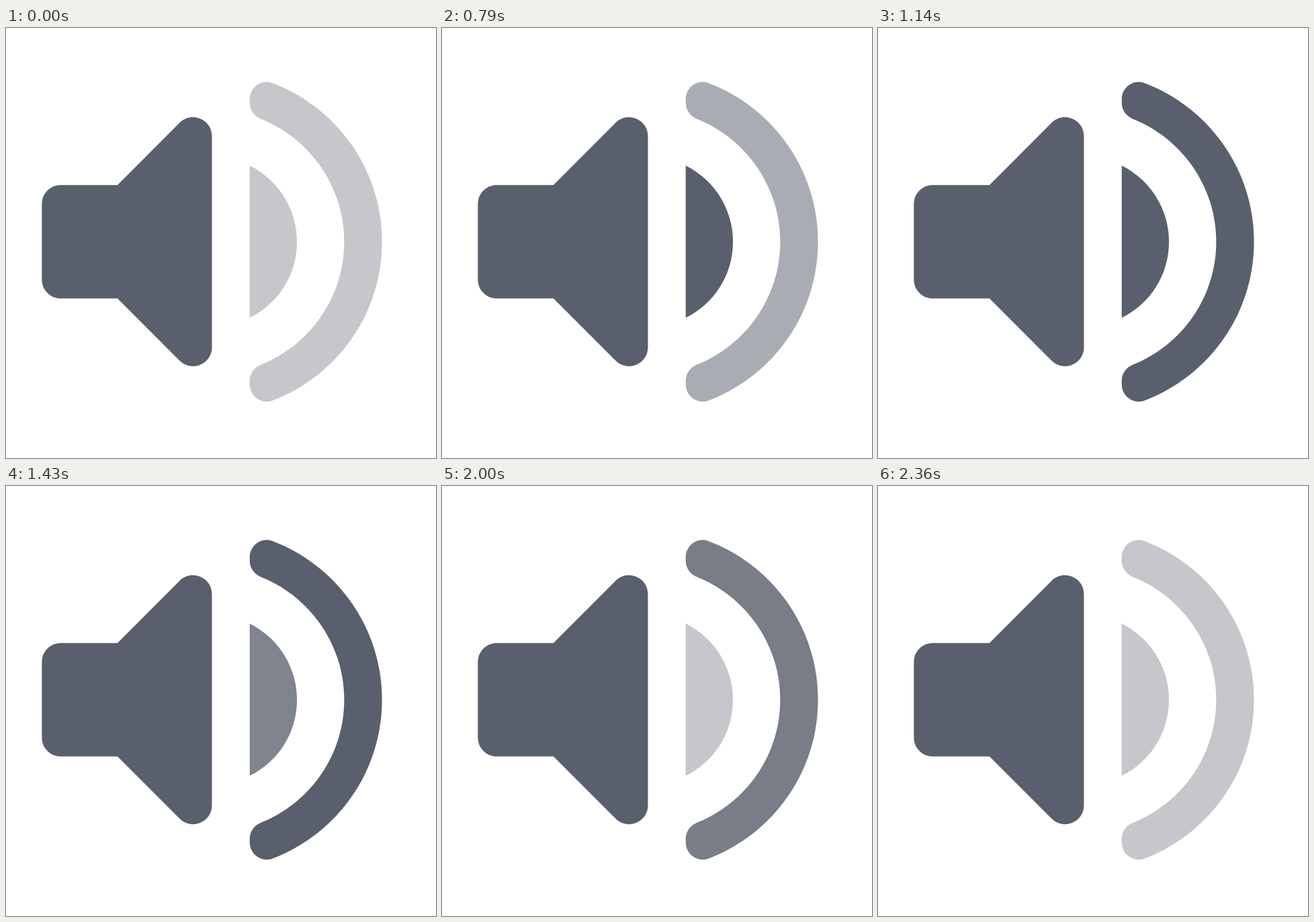
These frames come from a looping animation (640x640 px, 2430 ms). An HTML page:

```html
<!DOCTYPE html>
<html lang="en">
<head>
<meta charset="utf-8">
<title>Volume</title>
<style>
  html, body { margin: 0; height: 100%; overflow: hidden; background: #fff; }
  svg { display: block; width: 100%; height: 100%; fill: #595f6c; }
</style>
</head>
<body>
<svg viewBox="0 0 640 640">
  <g transform="translate(-31 -19.3) scale(28.125)">
    <path d="M3 10v4c0 .55.45 1 1 1h3l3.29 3.29c.63.63 1.71.18 1.71-.71V6.41c0-.89-1.08-1.34-1.71-.71L7 9H4c-.55 0-1 .45-1 1z"/>
    <path id="inner" d="M16.5 12c0-1.77-1.02-3.29-2.5-4.03v8.05c1.48-.73 2.5-2.25 2.5-4.02z"/>
    <path id="outer" d="M14 4.45v.2c0 .38.25.71.6.85C17.18 6.53 19 9.06 19 12s-1.82 5.47-4.4 6.5c-.36.14-.6.47-.6.85v.2c0 .63.63 1.07 1.21.85C18.6 19.11 21 15.84 21 12s-2.4-7.11-5.79-8.4c-.58-.23-1.21.22-1.21.85z"/>
  </g>
</svg>
<script>
const LOOP = 2430, STEP = 1000 / 14, FADE = 560, DIM = 0.35;
const inner = document.getElementById('inner');
const outer = document.getElementById('outer');

function ease(ms) {
  const p = Math.min(1, Math.max(0, ms / FADE));
  return p * p * (3 - 2 * p);
}

// Fades in at once; the fade out holds full strength, then drops.
function level(t, start) {
  const out = ease(t - start - 1200);
  const p = ease(t - start) - (out < 0.2 ? 0 : out);
  return DIM + (1 - DIM) * p;
}

function draw(now) {
  const frame = Math.min(33, Math.floor((now % LOOP + 4.5) / STEP));
  const t = frame * STEP;
  inner.style.opacity = level(t, 0);
  outer.style.opacity = level(t, 600);
}

const begin = performance.now();
function tick() {
  draw(performance.now() - begin);
  requestAnimationFrame(tick);
}
tick();
</script>
</body>
</html>
```
